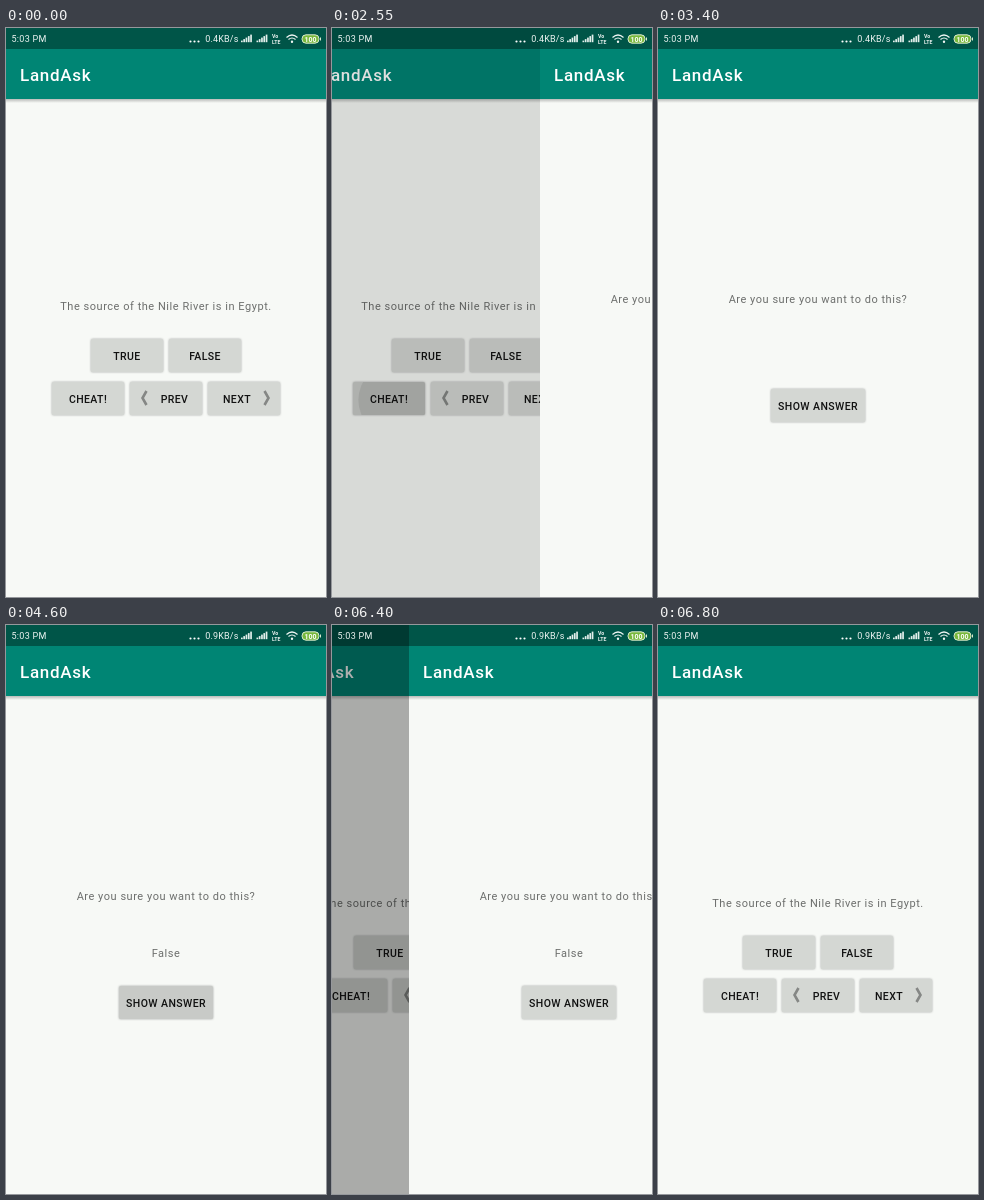
Recreate the animation shown at these times as an HTML page. Size 320 px wide and 569 px high, loop 8000 ms.

```html
<!DOCTYPE html>
<html lang="en">
<head>
<meta charset="utf-8">
<title>Quiz app</title>
<style>
  html, body { margin: 0; width: 100%; height: 100%; overflow: hidden; background: #f7f9f6; }
  svg { display: block; width: 320px; height: 569px; }
  text { font: 11px Roboto, sans-serif; letter-spacing: .53px; fill: #6d6f6d; }
  .mid { text-anchor: middle; }
  .title { font-size: 17px; font-weight: 500; letter-spacing: .7px; fill: #fff; }
  .label { font-size: 10.5px; font-weight: 500; letter-spacing: .4px; fill: #111; text-anchor: middle; }
  .btn { fill: #d4d7d3; filter: drop-shadow(0 .8px .9px #0005); }
  .chevron { fill: none; stroke: #858785; stroke-width: 2.6; }
  .status text { font-size: 9px; letter-spacing: .3px; fill: #eef5f3; }
  .status .speed { letter-spacing: .15px; text-anchor: end; }
  .status .tiny { font-size: 5.2px; font-weight: 700; letter-spacing: 0; }
  .status .level { font-size: 7px; font-weight: 700; letter-spacing: 0; fill: #fff; text-anchor: middle; }
</style>
</head>
<body>
<svg id="stage" viewBox="0 0 320 569"></svg>
<script>
const LOOP = 8000, SLIDE = 391;
const OPEN = 2511, CLOSE = 6375;
const CHEAT_TAP = 2400, SHOW_TAP = 4000, ANSWER = 4150, SPEED = 4000;

const clamp = v => Math.min(1, Math.max(0, v));
const easeOut = u => 1 - (1 - clamp(u)) ** 4;
const $ = id => document.getElementById(id);

const button = (label, x, y, w, textX = x + w / 2) => `
  <rect class="btn" x="${x}" y="${y}" width="${w}" height="33" rx="1.5"/>
  <text class="label" x="${textX}" y="${y + 20.5}">${label}</text>`;

// A pressed tint plus a circle growing inside the button
const ripple = (id, x, y, w, cx) => `
  <clipPath id="${id}Clip"><rect x="${x}" y="${y}" width="${w}" height="33" rx="1.5"/></clipPath>
  <g id="${id}" clip-path="url(#${id}Clip)">
    <rect x="${x}" y="${y}" width="${w}" height="33" opacity=".06"/>
    <circle cx="${cx}" cy="${y + 18}"/>
  </g>`;

const page = (id, body) => `
  <g id="${id}">
    <rect width="320" height="569" fill="#f7f9f6"/>
    <rect y="71" width="320" height="4" fill="url(#shade)"/>
    <rect width="320" height="71" fill="#008574"/>
    <rect width="320" height="21" fill="#005548"/>
    <text class="title" x="14" y="53">LandAsk</text>
    ${body}
  </g>`;

const signal = x => [0, 1, 2, 3, 4].map(i =>
  `<rect x="${x + i * 2.3}" y="${12.6 - i * 1.5}" width="1.7" height="${1.6 + i * 1.5}" fill="#e3efec"/>`).join('');

$('stage').innerHTML = `
  <linearGradient id="shade" x2="0" y2="1">
    <stop stop-opacity=".25"/><stop offset="1" stop-opacity="0"/>
  </linearGradient>
  ${page('quiz', `
    <text class="mid" x="160" y="281.5">The source of the Nile River is in Egypt.</text>
    ${button('TRUE', 85, 311, 72)}
    ${button('FALSE', 163, 311, 72)}
    ${button('CHEAT!', 46, 354, 72)}
    ${button('PREV', 124, 354, 72, 168.5)}
    ${button('NEXT', 202, 354, 72, 231)}
    <path class="chevron" d="M140.5 363l-4 7 4 7M258.5 363l4 7-4 7"/>
    ${ripple('cheatRipple', 46, 354, 72, 88)}
    <rect id="dim" width="320" height="569"/>`)}
  ${page('cheat', `
    <text class="mid" x="160" y="274.5">Are you sure you want to do this?</text>
    <text class="mid" id="answer" x="160" y="331.5">False</text>
    ${button('SHOW ANSWER', 113, 361, 94)}
    ${ripple('showRipple', 113, 361, 94, 160)}`)}
  <g class="status">
    <text x="5.5" y="14">5:03 PM</text>
    <path d="M184.5 13.5h0m4 0h0m4 0h0" stroke="#fff" stroke-width="2.2" stroke-linecap="round"/>
    <text class="speed" id="speed" x="232.5" y="14"></text>
    ${signal(235)}${signal(250.5)}
    <text class="tiny" x="266" y="10">Vo</text>
    <text class="tiny" x="266" y="15.5">LTE</text>
    <g fill="none" stroke="#eef5f3" stroke-width="1.2">
      <path d="M280.5 9.5q5.5-5 11 0M282.5 11.5q3.5-3 7 0"/>
      <circle cx="286" cy="13.8" r=".6"/>
    </g>
    <rect x="296" y="6.8" width="17" height="8.4" rx="4" fill="#78b83c" stroke="#d9ead0"/>
    <path d="M314.5 9.5v3" stroke="#d9ead0"/>
    <text class="level" x="304.5" y="13.5">100</text>
  </g>`;

function press(id, age, visible, radius) {
  const g = $(id), circle = g.querySelector('circle');
  g.style.display = visible && age >= 0 ? '' : 'none';
  circle.setAttribute('r', Math.min(radius, 14 + Math.max(0, age) * .15));
  return circle;
}

// Pages sit on whole pixels, so their edges stay sharp
const moveTo = (id, x) => $(id).setAttribute('transform', `translate(${Math.round(x)})`);

function draw(t) {
  const closing = t >= CLOSE;
  const shown = closing ? 1 - easeOut((t - CLOSE) / SLIDE) : easeOut((t - OPEN) / SLIDE);
  const shift = shown * (closing ? 83 : 72);

  moveTo('quiz', -shift);
  moveTo('cheat', 320 * (1 - shown));
  $('dim').setAttribute('opacity', shift * .005);

  press('cheatRipple', t - CHEAT_TAP, !closing, 50).setAttribute('opacity', .08);
  press('showRipple', t - SHOW_TAP, !closing, 56)
    .setAttribute('opacity', .08 * (1 - clamp((t - SHOW_TAP - 250) / 200)));

  $('answer').style.display = t < ANSWER ? 'none' : '';
  $('speed').textContent = t < SPEED ? '0.4KB/s' : '0.9KB/s';
}

const start = performance.now();
function tick() {
  draw((performance.now() - start) % LOOP);
  requestAnimationFrame(tick);
}
tick();
</script>
</body>
</html>
```
